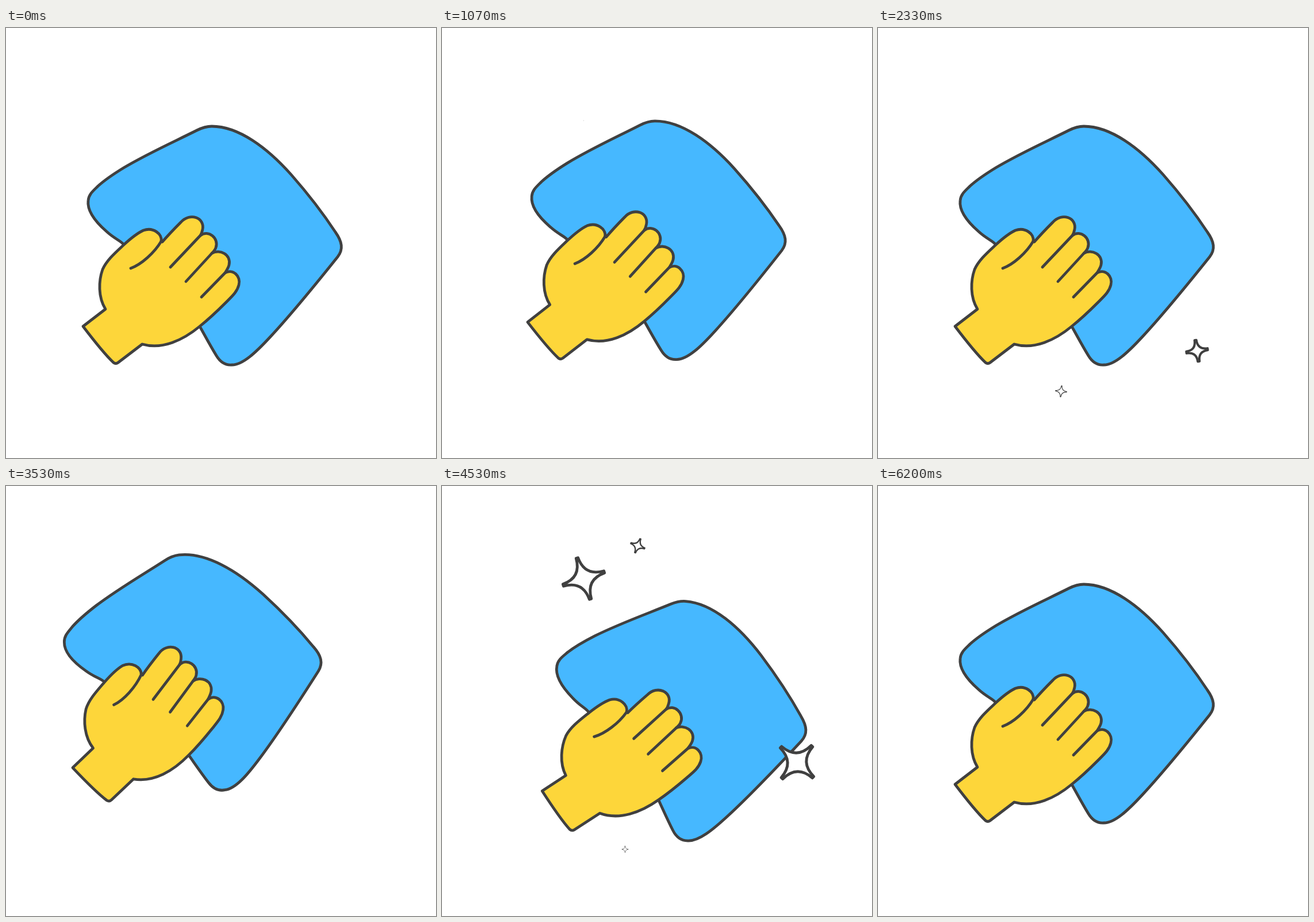
These frames come from a looping animation (748x748 px, 6.23 s). An HTML page with a canvas:

```html
<!DOCTYPE html>
<html>
<head>
<meta charset="utf-8">
<style>
html, body { margin: 0; width: 100%; height: 100%; overflow: hidden; background: #fff; }
canvas { display: block; width: 100vw; height: 100vh; }
</style>
</head>
<body>
<canvas id="stage" width="748" height="748"></canvas>
<script>
const ctx = document.getElementById('stage').getContext('2d');
const LOOP = 6230, WIPE = 3066;
const INK = '#404040', BLUE = '#46b8ff', YELLOW = '#fdd63a';
const PIVOT = [313, 441];

// Poses as [dx, dy, degrees] around the pivot
const REST = [0, 0, 0], UPPER = [-33, -57.5, -7.45], LOWER = [49.5, 27.5, 4.75];
const EASY = [.333, 0, .667, 1], GLIDE = [.15, .17, .45, .9];
const MOVES = [
  { from: REST, to: UPPER, start: 40, end: 615, curve: EASY },
  { from: UPPER, to: LOWER, start: 640, end: 1425, curve: EASY },
  { from: LOWER, to: REST, start: 1425, end: 2125, curve: GLIDE }
];

// turn: angle, speed and acceleration, counted in 100 ms from SPIN_ZERO
const SPIN_ZERO = 1465;
const STARS = [
  { x: 246.5, y: 161, arm: 37.5, start: 1000, end: 2050, turn: [-18, 17, 0] },
  { x: 617.5, y: 480.5, arm: 38.5, start: 1070, end: 2290, turn: [43, -5.4, 4] },
  { x: 340.5, y: 104, arm: 27, start: 1249, end: 2340, turn: [21, 29, 0] },
  { x: 318.5, y: 632, arm: 38.5, start: 1320, end: 2570, turn: [0, 21.5, 0] },
  { x: 555, y: 561.5, arm: 22, start: 1420, end: 2730, turn: [-14, 21.4, 0] }
];
const GROW = 440, SHRINK = 600;

const cloth = new Path2D(`M332 178 C340 174 349 171 358 171 C405 171 455 209 496 255
  C525 288 550 320 573 355 C585 372 587 385 577 398 C545 438 500 494 460 537
  C435 564 412 586 393 586 C380 587 372 580 366 570 C355 552 346 535 337 519
  L260 450 L205 377 C200 370 189 367 175 354 C152 334 141 316 143 300
  C144 289 152 283 160 275 C170 266 187 254 205 243 C245 219 290 199 332 178Z`);
const hand = new Path2D(`M134 519 L173 489 C160 468 161 440 168 420 C175 404 190 391 205 377
  C217 366 228 357 239 352 C256 346 272 358 270 371 L272 372 C285 357 295 347 304 338
  C320 320 346 330 342 350 C341 354 341 357 338 361 C352 350 371 366 365 382
  C364 386 361 389 358 392 C372 384 392 394 388 412 C387 417 384 421 381 426
  C395 418 409 432 405 447 C402 459 394 466 383 477 C368 492 352 507 337 519
  C308 543 272 560 237 550 L195 582 Q191 585 187 582 C170 566 150 540 134 519Z`);
const creases = new Path2D(`M270 371 C258 391 236 411 217 418
  M338 361 L286 416 M358 392 L313 441 M381 426 L340 468`);

const clamp = v => Math.min(1, Math.max(0, v));
const inOut = p => p < .5 ? 4 * p ** 3 : 1 - 4 * (1 - p) ** 3;

function bezier(p, [x1, y1, x2, y2]) {
  const at = (u, a, b) => 3 * u * (1 - u) ** 2 * a + 3 * u * u * (1 - u) * b + u ** 3;
  let lo = 0, hi = 1;
  for (let i = 0; i < 24; i++) {
    const mid = (lo + hi) / 2;
    if (at(mid, x1, x2) < p) lo = mid; else hi = mid;
  }
  return at(lo, y1, y2);
}

function poseAt(t) {
  const move = MOVES.findLast(m => t >= m.start) || MOVES[0];
  const k = bezier(clamp((t - move.start) / (move.end - move.start)), move.curve);
  return move.from.map((v, i) => v + (move.to[i] - v) * k);
}

function paint(path, fill) {
  if (fill) {
    ctx.fillStyle = fill;
    ctx.fill(path);
  }
  ctx.stroke(path);
}

function drawWipe(t) {
  const [dx, dy, deg] = poseAt(t), [px, py] = PIVOT;
  ctx.save();
  ctx.translate(px + dx, py + dy);
  ctx.rotate(deg * Math.PI / 180);
  ctx.translate(-px, -py);
  paint(cloth, BLUE);
  paint(hand, YELLOW);
  paint(creases);
  ctx.restore();
}

function starPath(arm) {
  const path = new Path2D(), tip = 1.8, dip = arm * .08;
  path.moveTo(-tip, -arm);
  for (const [x, y] of [[1, -1], [1, 1], [-1, 1], [-1, -1]]) {
    // Quadrants alternate between leaving a vertical and a horizontal arm
    const v = [x * tip, y * arm], h = [x * arm, y * tip];
    const [a, b] = x * y < 0 ? [v, h] : [h, v];
    path.lineTo(...a);
    path.quadraticCurveTo(x * dip, y * dip, ...b);
  }
  path.closePath();
  return path;
}
for (const star of STARS) star.path = starPath(star.arm);

function drawStar({ x, y, start, end, turn, path }, t) {
  const size = inOut(clamp((t - start) / GROW)) * inOut(clamp((end - t) / SHRINK));
  if (size <= 0) return;
  const s = (t - SPIN_ZERO) / 100;
  ctx.save();
  ctx.translate(x, y);
  ctx.rotate((turn[0] + turn[1] * s + turn[2] * s * s) * Math.PI / 180);
  ctx.scale(size, size);
  paint(path, '#fff');
  ctx.restore();
}

const origin = performance.now();
function frame() {
  const time = (performance.now() - origin) % LOOP;
  const t = time < WIPE ? time : time - WIPE;
  ctx.clearRect(0, 0, 748, 748);
  ctx.strokeStyle = INK;
  ctx.lineWidth = 4.8;
  ctx.lineJoin = ctx.lineCap = 'round';
  drawWipe(t);
  for (const star of STARS) drawStar(star, t);
  requestAnimationFrame(frame);
}
frame();
</script>
</body>
</html>
```
